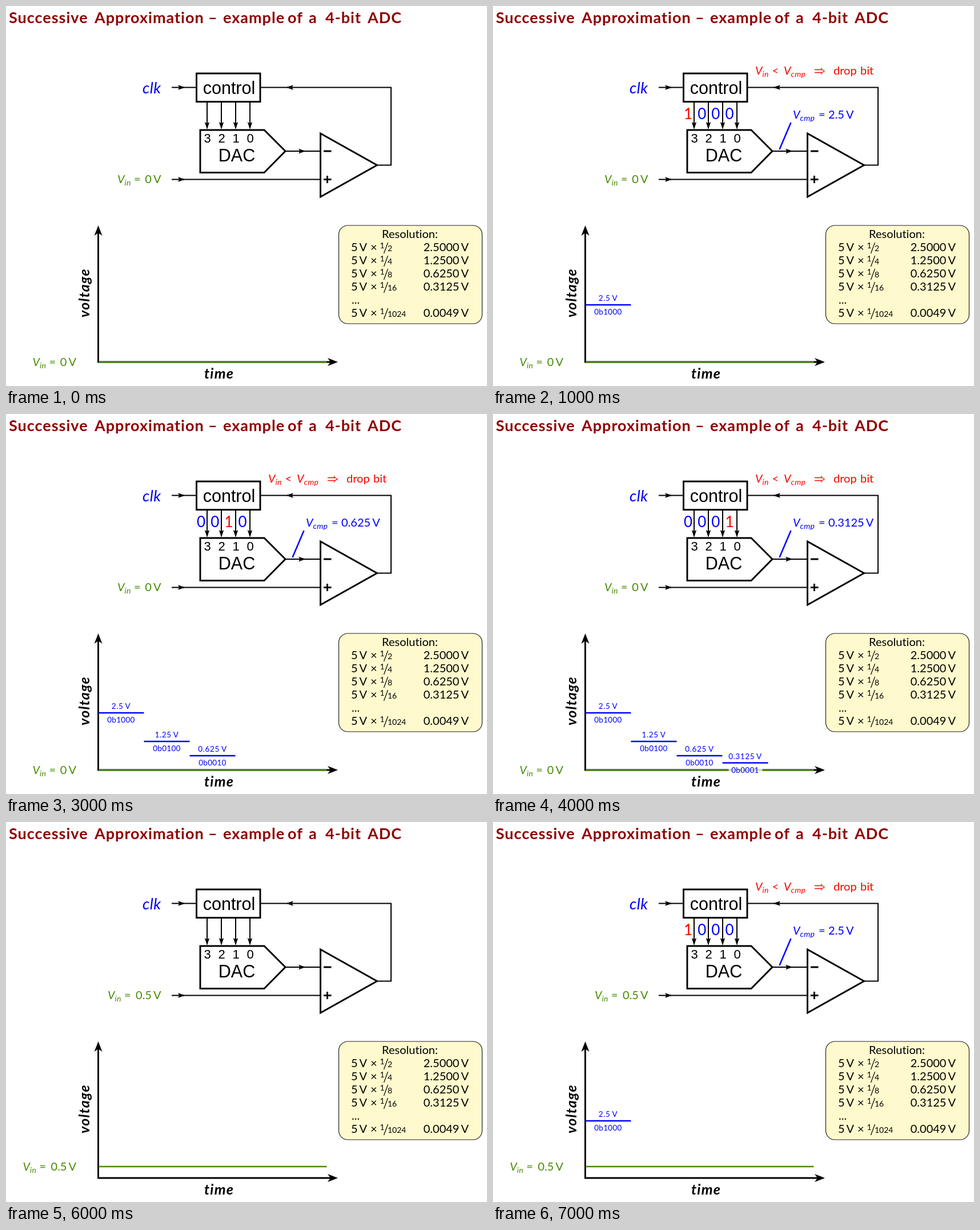
An HTML page for the animation above (8000 ms loop, 842 px wide and 665 px high).

```html
<!DOCTYPE html>
<html lang="en">
<head>
<meta charset="utf-8">
<title>Successive Approximation</title>
<style>
  html, body { margin: 0; width: 100%; height: 100%; overflow: hidden; background: #fff; }
  svg { display: block; width: 842px; height: 665px; font: 20px Lato, sans-serif; font-variant-ligatures: none; }
  text { white-space: pre; font-variant-ligatures: none; }
  .title { font-size: 27px; font-weight: 700; fill: #8f0000; letter-spacing: 1px; }
  .axis { font: italic 700 25px Lato, sans-serif; text-anchor: middle; letter-spacing: 1.2px; }
  .wire { fill: none; stroke: #000; stroke-width: 2; }
  .box { fill: none; stroke: #000; stroke-width: 2.9; }
  .chip { font: 30.5px "Liberation Sans", Arial, sans-serif; text-anchor: middle; }
  .pin { font-size: 22px; }
  .blue { fill: #00f; }
  .red { fill: #f00; }
  .green { fill: #458b00; }
  .it { font-style: italic; }
  .clk { font-size: 27px; letter-spacing: .5px; }
  .sub { font-size: 14px; font-style: italic; letter-spacing: .3px; }
  .num { font-size: 14px; }
  .mid { text-anchor: middle; }
  .end { text-anchor: end; }
  .bit { font-size: 26px; text-anchor: middle; }
  .small { font-size: 13.5px; text-anchor: middle; letter-spacing: .6px; }
  .code { letter-spacing: .3px; }
  .big { font-size: 25px; }
  .tight { letter-spacing: -.8px; }
</style>
</head>
<body>
<svg viewBox="0 0 842 665">
  <defs>
    <path id="head" d="M0 0L-13 -4.2L-10.5 0L-13 4.2Z"/>
    <path id="tip" d="M0 0L-18 -7L-13 0L-18 7Z"/>
  </defs>

  <g class="title">
    <text x="5" y="30">Successive</text>
    <text x="155" y="30">Approximation</text>
    <text x="354" y="30">–</text>
    <text x="380" y="30">example</text>
    <text x="493" y="30">of</text>
    <text x="530" y="30">a</text>
    <text x="559" y="30">4-bit</text>
    <text x="633" y="30">ADC</text>
  </g>

  <g class="wire">
    <path d="M290 142.5H333M445 142.5H674V278.5H650M489 254H550M290 303.5H550"/>
    <path d="M352 167V210M377 167V210M402 167V210M427 167V210"/>
  </g>
  <use href="#head" x="314" y="142.5"/>
  <use href="#head" x="314" y="303.5"/>
  <use href="#head" x="525" y="254"/>
  <use href="#head" transform="translate(490 142.5) scale(-1 1)"/>
  <g id="pins"></g>

  <path class="box" d="M333.5 118H445V167.5H333.5ZM340 217H452L489 254L452 291.5H340ZM550.5 223L649.5 278.5L550.5 334ZM556 254H569.5M556 303.5H569.5M562.5 297V310"/>
  <text class="chip" x="390.5" y="154">control</text>
  <text class="chip" x="404" y="272">DAC</text>
  <text class="blue it clk" x="239" y="153">clk</text>

  <path class="box" d="M161.5 624V396M160 623H570"/>
  <use href="#tip" transform="translate(161.5 384) rotate(-90)"/>
  <use href="#tip" x="581" y="623"/>
  <text class="axis" transform="translate(146 502) rotate(-90)">voltage</text>
  <text class="axis" x="373" y="652">time</text>

  <g id="live"></g>

  <rect x="582.5" y="384" width="251" height="172" rx="16" fill="#fffacd" stroke="#222" stroke-width="1.2"/>
  <text class="mid" x="707" y="406">Resolution:</text>
  <g id="table"></g>
</svg>

<script>
const $ = id => document.getElementById(id);
const text = (x, y, str, cls = '') => `<text x="${x}" y="${y}" class="${cls}">${str}</text>`;
const line = (d, color, width = 2.5) =>
  `<path d="${d}" fill="none" stroke="${color}" stroke-width="${width}"/>`;
const volts = v => `${v}<tspan dx="3">V</tspan>`;
const symbol = (x, y, sub, color) =>
  text(x, y, 'V', color + ' it') + text(x + 12.5, y + 4, sub, color + ' sub');

const GREEN = '#458b00', BLUE = '#00f';
const levelY = v => 623 - 40 * v;
const binary = code => code.toString(2).padStart(4, '0');

$('pins').innerHTML = [3, 2, 1, 0].map((n, i) => {
  const x = 352 + 25 * i;
  return `<use href="#head" transform="translate(${x} 216) rotate(90)"/>` +
    text(x + .5, 239, n, 'chip pin');
}).join('');

$('table').innerHTML = [2, 4, 8, 16, 0, 1024].map((n, i) => {
  const y = 429 + 23 * i;
  if (!n) return text(605, y, '...');
  return text(604, y, volts(5)) + text(638, y, '×') + text(654.5, y - 5, 1, 'num') +
    line(`M661.5 ${y + 4}L668.5 ${y - 15}`, '#000', 1.2) + text(668, y, n, 'num') +
    text(810, y, volts((5 / n).toFixed(4)), 'end');
}).join('');

// Input label, right-aligned at x
const inputLabel = (x, y, v) => {
  const left = x - (v ? 93.5 : 76.5);
  return symbol(left, y, 'in', 'green') + text(left + 29, y, '=', 'green') +
    text(x, y, volts(v), 'green end');
};

function step(code, i) {
  const v = code * 5 / 16, x = 161.5 + 80 * i, mid = x + 40, y = levelY(v);
  return `<rect x="${mid - 29}" y="${y + 5}" width="59" height="14" fill="#fff" opacity=".72"/>` +
    line(`M${x} ${y}h80`, BLUE) +
    text(mid, y - 7, volts(code ? v : '0.0'), 'small blue') +
    text(mid, y + 17, '0b' + binary(code), 'small code blue');
}

function compare(code) {
  const v = code ? code * 5 / 16 : '0.0';
  let out = [...binary(code)].map((b, i) =>
    text(341.5 + 24.2 * i, 198, b, 'bit ' + (b === '1' ? 'red' : 'blue'))).join('');
  out += line('M521.5 204L501.5 251', BLUE) + symbol(525, 197, 'cmp', 'blue') +
    text(570, 197, '=', 'blue') + text(587, 197, volts(v), 'blue');
  if (code) {
    out += symbol(459, 120, 'in', 'red') + text(488.5, 120, '&lt;', 'red') +
      symbol(509, 120, 'cmp', 'red') +
      line('M563 111.5H577M563 116.5H577M574 108.5Q576.5 112.5 580 114Q576.5 115.5 574 119.5', '#f00', 1.3) +
      text(596, 120, 'drop', 'red') + text(643, 120, 'bit', 'red');
  } else {
    out += '<rect x="282" y="344" width="313.5" height="31.5" rx="8" fill="#ffff66"/>' +
      text(288, 368, 'result:', 'blue big') + text(367.5, 368, '0b0000', 'blue big tight') +
      text(476, 368, 'V', 'blue big it') + text(491.5, 372, 'in', 'blue sub" style="font-size:18px') +
      text(511.5, 368, '≈', 'blue big') + text(589.5, 368, volts('0.0'), 'blue big end');
  }
  return out;
}

// Each second: idle, four trials, then the result
const trials = [8, 4, 2, 1, 0];
function draw(second) {
  const vin = second < 6 ? 0 : 0.5, done = trials.slice(0, second % 6);
  const y = levelY(vin);
  return inputLabel(271.5, 310, vin) + inputLabel(123, y + 7, vin) +
    line(`M162 ${y}H561.5`, GREEN) +
    done.map(step).join('') + (done.length ? compare(done[done.length - 1]) : '');
}

const start = performance.now();
let shown = -1;
function tick() {
  const second = Math.floor((performance.now() - start) / 1000) % 8;
  if (second !== shown) $('live').innerHTML = draw(shown = second);
  requestAnimationFrame(tick);
}
tick();
</script>
</body>
</html>
```
